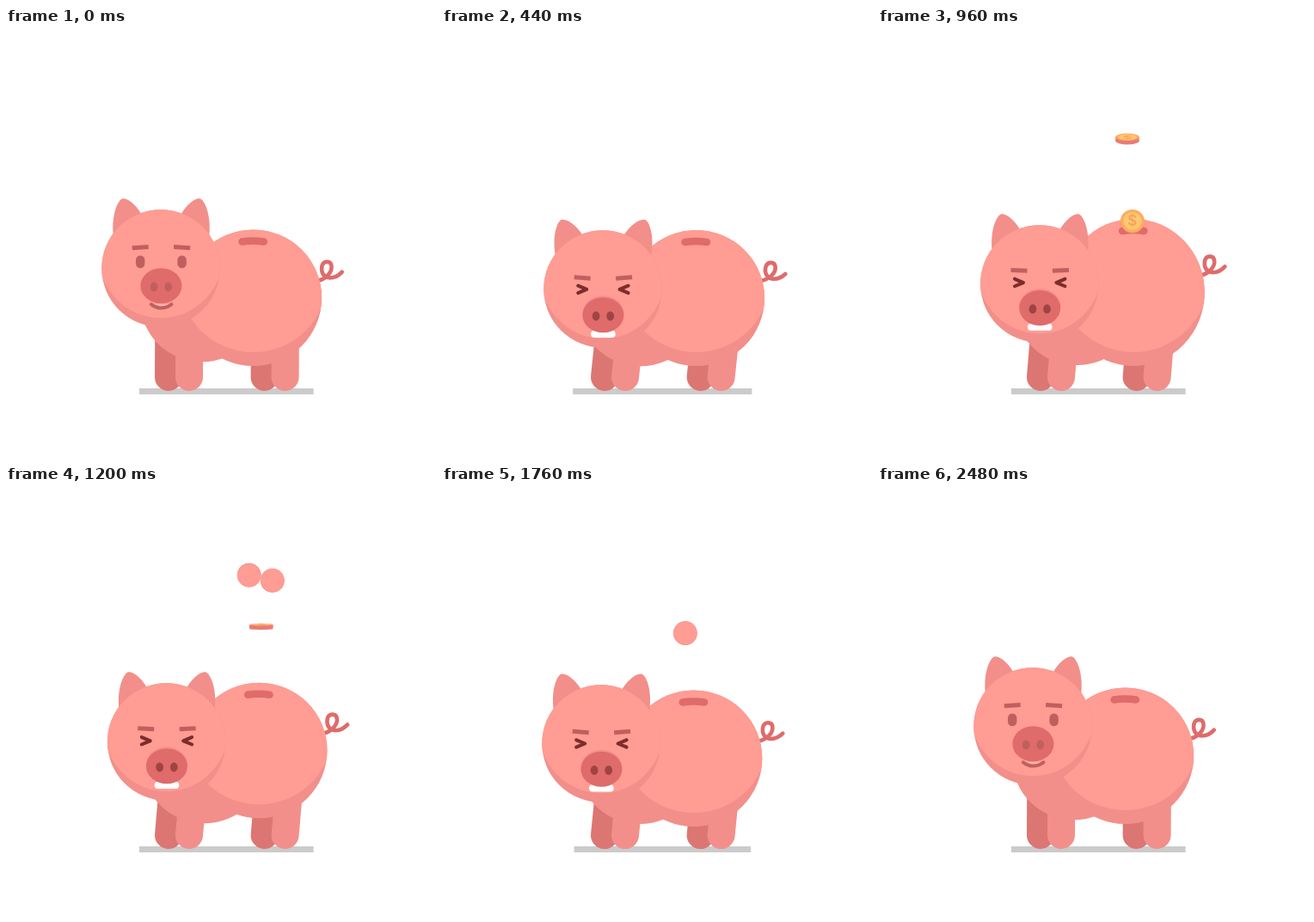
An HTML page that plays this animation: 500 by 500 pixels, repeating every 2760 ms.

```html
<!DOCTYPE html>
<html lang="en">
<head>
<meta charset="utf-8">
<title>Piggy bank</title>
<style>
html, body { margin: 0; width: 100%; height: 100%; overflow: hidden; background: #fff; }
svg { display: block; width: 100%; height: 100%; }
</style>
</head>
<body>
<svg id="stage" viewBox="0 0 500 500"></svg>
<script>
const LOOP = 2760, STEP = 40;
const LIGHT = '#ff9c93', MID = '#f28f8a', DARK = '#dc7673', DEEP = '#df6b6b', LINE = '#c0605e';

// head centre, how far the face sinks, ear and tail swing, body centre, top and bottom
const pose = (hx, hy, sink, flap, cx, top, bot) => ({ hx, hy, sink, flap, cx, top, bot });
const REST = pose(180, 279.5, .05, 0, 287.5, 234.5, 393);
const CROUCH = pose(187, 303.5, 1.05, 4, 295.5, 235, 393);
const JUMP = pose(187.8, 297.5, .82, 0, 297, 222, 393);
const LAND = pose(186.5, 297.5, .85, 0, 294, 229, 386);
const SETTLE = pose(185, 299.5, 1, 2, 292.7, 237.5, 396);
const BACK = pose(179.5, 276, -.1, -3, 286, 233, 392);

// sideways speed and turning speed of each coin
const RISE = 400, FALL = 225, APEX = 103, R = 13.8;
const COINS = [[-.03, .0074], [.058, .0129], [.018, .0148], [-.024, .0063]]
  .map(([vx, spin], i) => ({ vx, spin, t0: 790 + 155 * i }));

// the pig hops once for every coin it throws
const TIMELINE = [
  [0, REST], [160, blend(REST, BACK, 1.8)], [440, CROUCH], [560, CROUCH], [690, SETTLE],
  ...COINS.flatMap(c => [[c.t0 + 15, JUMP], [c.t0 + 90, LAND]]),
  [1600, LAND], [1760, SETTLE], [2000, BACK], [2320, REST], [LOOP, REST]
];

const stage = document.getElementById('stage');
const ease = k => (1 - Math.cos(Math.PI * k)) / 2;
const ramp = (t, a, b) => Math.min(1, Math.max(0, (t - a) / (b - a)));
function mix(a, b, k) { return a + (b - a) * k; }
function blend(a, b, k) {
  return Object.fromEntries(Object.keys(a).map(n => [n, mix(a[n], b[n], k)]));
}

const ell = (x, y, rx, ry, fill, more = '') =>
  `<ellipse cx="${x}" cy="${y}" rx="${rx}" ry="${ry}" fill="${fill}" ${more}/>`;
const rect = (x, y, w, h, fill, more = '') =>
  `<rect x="${x}" y="${y}" width="${w}" height="${h}" fill="${fill}" ${more}/>`;
const stroke = (d, color, w, more = '') =>
  `<path d="${d}" fill="none" stroke="${color}" stroke-width="${w}" stroke-linecap="round" stroke-linejoin="round" ${more}/>`;
const group = (attr, body) => `<g ${attr}>${body}</g>`;

function poseAt(t) {
  const i = TIMELINE.findIndex(k => k[0] > t) - 1;
  const [ta, a] = TIMELINE[i], [tb, b] = TIMELINE[i + 1];
  return blend(a, b, ease((t - ta) / (tb - ta)));
}

function eyeColor(t) {
  const k = .85 * (ramp(t, 0, 160) - ramp(t, 2040, 2440));
  return `rgb(${[mix(192, 112, k), mix(96, 36, k), mix(94, 35, k)].map(Math.round)})`;
}

function coin(c, t, slot) {
  const age = t - c.t0;
  const y = age < RISE
    ? mix(slot + 4, APEX, 1 - (1 - age / RISE) ** 3)
    : mix(APEX, 255, ease((age - RISE) / FALL));
  const cos = Math.cos(c.spin * age), ry = Math.abs(cos) * R;
  const off = 2.4 * Math.sin(c.spin * age) * Math.sign(cos), rim = Math.abs(off);
  let s = ell(0, off, R, ry, '#e97b7b') + rect(-R, -rim, 2 * R, 2 * rim, '#e97b7b');
  if (cos < 0) s += ell(0, -off, R, ry, LIGHT);
  else s += group(`transform="translate(0 ${-off}) scale(1 ${cos})"`,
    ell(0, 0, R, R, '#ffad5a') + ell(0, 0, 10.5, 10.5, '#ffc775') +
    `<text y="6" text-anchor="middle" font-family="Inter, Arial, sans-serif" font-weight="600" font-size="17" fill="#f7a453">$</text>`);
  return group(`transform="translate(${295 + c.vx * age} ${y})"`, s);
}

// a round form with a lighter upper part
function ball(id, x, y, rx, ry, lift, rim) {
  const cy = y - lift;
  return `<clipPath id="${id}">${ell(x, y, rx, ry, '#000')}</clipPath>` + ell(x, y, rx, ry, MID) +
    ell(x, cy, rx * 1.065, y + ry - rim - cy, LIGHT, `clip-path="url(#${id})"`);
}

function legs(p, x, color) {
  const lean = 4.6 * p.sink;
  return [x, x + 111.6].map(f => stroke(`M${f} 406L${f + lean} 360`, color, 32)).join('');
}

function ears(p) {
  const d = 'M-55-36C-58-60-51-78-45-81C-39-83-27-73-20-58L-28-36Z';
  return [1, -1].map(s => `<path d="${d}" fill="${MID}" ` +
    `transform="translate(${p.hx + .5 - s / 2} ${p.hy}) scale(${s} 1) rotate(${-p.flap * 1.3} -40 -42)"/>`).join('');
}

function face(p, t) {
  const squint = t >= 260 && t < 1880;
  const color = eyeColor(t), nose = squint ? '#9f4442' : LINE;
  const fx = p.hx + .4, tilt = 8 * p.sink - 4;
  const brow = p.hy - 25 + 11.5 * p.sink, eye = p.hy - 8 + 8 * p.sink, snout = p.hy + 19.8 + 10 * p.sink;
  let s = '';
  for (const side of [-1, 1]) {
    const x = fx + side * 24.2;
    s += rect(-9.5, -2.5, 19, 5, LINE, `transform="translate(${x} ${brow}) rotate(${-side * tilt})"`);
    s += squint
      ? stroke('M-5-4.2L5 0L-5 4.2', color, 4, `transform="translate(${x} ${eye}) scale(${-side} 1)"`)
      : rect(x - 5.2, eye - 7.3, 10.4, 14.6, color, 'rx="5.2"');
  }
  if (squint) {
    s += rect(fx - 14.3, snout + 18, 28.6, 8.3, '#fff', 'rx="4"');
    s += ell(fx, snout - 2, 24, 20.5, MID);
  } else {
    const y = snout + 21.5;
    s += `<path d="M${fx - 11} ${y}q11 8 23 0z" fill="#ffb5ad"/>`;
    s += stroke(`M${fx - 11.5} ${y}q11.5 8.5 23.5 0`, LINE, 4);
  }
  s += ell(fx, snout, 24, 20.5, DEEP);
  for (const side of [-1, 1]) s += ell(fx + side * 8.3, snout + 1.2, 4.4, 5.4, nose);
  return s;
}

function draw(now) {
  const t = Math.floor(now % LOOP / STEP) * STEP;
  const p = poseAt(t), slot = p.top + 13.7;
  const cy = (p.top + p.bot) / 2, ry = p.bot - cy, rx = 40 + ry / 2;
  const ground = 101.3 + .7 * p.flap;
  const coins = (from, to) => COINS.filter(c => t >= c.t0 + from && t < c.t0 + to)
    .map(c => coin(c, t, slot)).join('');

  stage.innerHTML =
    rect(256.3 - ground, 419, ground * 2, 7, '#cbcbcb') +
    coins(RISE, RISE + FALL) +
    stroke('M-2 1C7-1 15-8 14-16C13-22 5-22 3-16C1-8 5-3 10-2C16-1 22-4 26-8', DEEP, 4.6,
      `transform="translate(${p.cx + rx - 2} ${cy - 21}) rotate(${p.flap * 1.2 - 2.5})"`) +
    legs(p, 189, DARK) + legs(p, 213, MID) +
    ell(156 + p.hx * .4, 320 + 5 * p.sink, 71, 68, MID) +
    ball('body', p.cx, cy, rx, ry, 19, 16) +
    stroke(`M${p.cx - 13} ${slot + .3}q12.7-2 25.4 0`, DEEP, 8.4) +
    `<clipPath id="lip">${rect(0, 0, 500, slot + 4, '#000')}</clipPath>` +
    group('clip-path="url(#lip)"', coins(0, RISE)) +
    ears(p) +
    ball('head', p.hx, p.hy, 68.7, 68.3, 18, 10.5) +
    face(p, t);
}

let start = null;
function tick(now) {
  if (start === null) start = now;
  draw(Math.max(0, now - start));
  requestAnimationFrame(tick);
}
draw(0);
requestAnimationFrame(tick);
</script>
</body>
</html>
```
